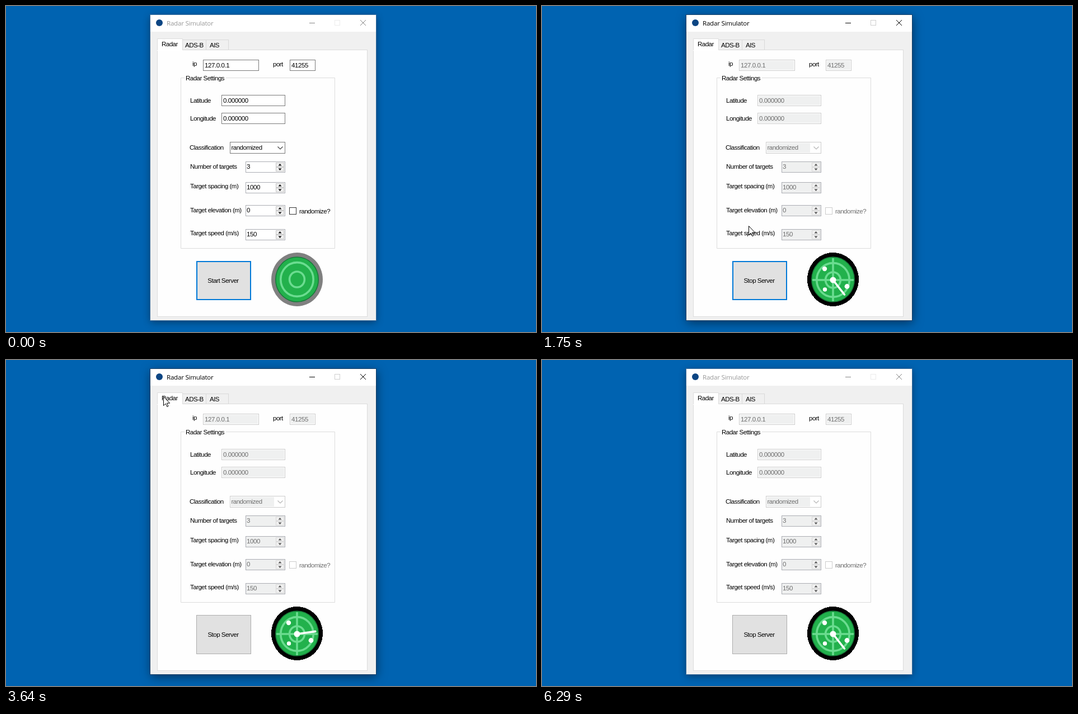
Animation of 947 by 583 pixels, one loop 6510 ms. Source, as an HTML page:

```html
<!DOCTYPE html>
<html lang="en">
<head>
<meta charset="utf-8">
<title>Radar Simulator</title>
<style>
html, body { margin: 0; width: 100%; height: 100%; overflow: hidden; background: #0063b1; }
svg { display: block; width: 947px; height: 583px; }
text { font: 11.5px "Liberation Sans", Arial, sans-serif; letter-spacing: -.5px; fill: #000; white-space: pre; }
text.val { letter-spacing: -.4px; }
text.mid { text-anchor: middle; }
text.title { font: 11.5px "Open Sans", "Noto Sans", sans-serif; letter-spacing: -.2px; fill: #999; }
rect { shape-rendering: crispEdges; }

.shadow { filter: drop-shadow(0 3px 7px rgba(0, 0, 0, .42)); }
.active .shadow { filter: drop-shadow(1px 4px 9px rgba(0, 0, 0, .5)); }
.edge { fill: none; stroke: #3f6f9c; }
.active .edge { stroke: #173f66; }
.chrome { fill: none; stroke: #858585; }
.max { fill: none; stroke: #ececec; }
.active .title { fill: #000; }
.active .chrome { stroke: #000; }
.active .max { stroke: #cfcfcf; }

.line { fill: none; stroke: #dcdcdc; }
.tab { fill: #f0f0f0; stroke: #d9d9d9; }
.front { fill: #fff; }
.hot-ads .ads, .hot-radar .radar { fill: #d8e9f8; }

.field { fill: #fff; stroke: #7a7a7a; }
.spin { fill: #fff; stroke: #abadb3; }
.step { fill: #f0f0f0; stroke: #c6c6c6; }
.grey { fill: none; }
.mark { fill: #111; }
.chevron { fill: none; stroke: #444; stroke-width: 1.2; }
.check { fill: #fff; stroke: #333; }
.on .p1 .field { stroke: #ccc; }
.on.warm .p1 .combo { stroke: #7a7a7a; }
.on .p1 .grey { fill: #eff0f0; }
.on .p1 .spin { fill: #eff0f0; }
.on .p1 .step { stroke: #d8d8d8; }
.on .p1 .dim { fill: #6d6d6d; }
.on .p1 .mark { fill: #555; }
.on .p1 .chevron { stroke: #b5b5b5; }
.on.warm .p1 .chevron { stroke: #444; }
.on .check { stroke: #ccc; }

.btn { fill: #e1e1e1; stroke: #adadad; }
.main { stroke: #0078d7; }
.focus { fill: none; stroke: #0078d7; }
.blur .main { stroke: #adadad; }
.hover .main { fill: #e5f1fb; }
.press .main { fill: #cce4f7; stroke: #005499; }
.hover .focus, .blur .focus { display: none; }

.adsb .p1, svg:not(.adsb) .p2, svg:not(.on) .run, .on .p1 .stop { display: none; }

.disc { fill: #22b14c; stroke: #187a3a; stroke-width: 1.6; }
.ring { fill: none; stroke: #6bdc90; stroke-width: 3.6; }
.white { fill: #fff; }
#sweep { stroke: #fff; stroke-width: 3.6; stroke-linecap: round; }
</style>
</head>
<body>
<svg id="stage" viewBox="0 0 947 583">
  <rect width="947" height="583" fill="#0063b1"/>
  <rect class="shadow" x="258" y="16" width="403" height="546" fill="#f0f0f0"/>
  <rect class="edge" x="257.5" y="15.5" width="404" height="547"/>
  <rect x="258" y="16" width="403" height="30" fill="#fff"/>
  <circle cx="274" cy="30" r="6" fill="#0b4583"/>
  <text class="title" x="287" y="35">Radar Simulator</text>
  <path class="chrome" d="M542 30.5h10M633 25l10 10M643 25l-10 10"/>
  <rect class="max" x="587.5" y="25.5" width="9" height="9"/>
  <rect x="270.5" y="78.5" width="375" height="477" fill="#fefefe" stroke="#dcdcdc"/>
  <g class="p1" id="radarPage"></g>
  <g class="p2" id="adsPage"></g>
  <path id="cursor" d="M.5 .5V16.6L4.2 13.1L6.8 18.6L9 17.6L6.5 12.2H11.6Z" fill="#fff" stroke="#000"/>
</svg>
<script>
const $ = id => document.getElementById(id);

const text = (x, y, s, cls = '') => `<text x="${x}" y="${y}" class="${cls}">${s}</text>`;
// Outlined box given by its outer pixel edges
const box = (x, y, w, h, cls) =>
  `<rect x="${x + .5}" y="${y + .5}" width="${w - 1}" height="${h - 1}" class="${cls}"/>`;
const fill = (x, y, w, h, cls) => `<rect x="${x}" y="${y}" width="${w}" height="${h}" class="${cls}"/>`;
const oval = (rx, ry, cls) => `<ellipse rx="${rx}" ry="${ry}" class="${cls}"/>`;
const dot = (x, y, r) => `<circle cx="${x}" cy="${y}" r="${r}" class="white"/>`;

const field = (x, y, w, s) =>
  box(x, y, w, 20, 'field') + fill(x + 2, y + 2, w - 4, 16, 'grey') + text(x + 3, y + 14, s, 'val dim');

const spinner = (y, s) =>
  box(428, y, 71, 20, 'spin') + box(482, y + 2, 15, 8, 'step') + box(482, y + 10, 15, 8, 'step') +
  `<path class="mark" d="M486.5 ${y + 7.5}h6l-3 -3.5zM486.5 ${y + 12.5}h6l-3 3.5z"/>` +
  text(430, y + 13, s, 'val dim');

const tab = (x0, x1, tx, s, cls = '') => box(x0, 60, x1 - x0 + 1, 19, 'tab ' + cls) + text(tx, 74, s);
const frontTab = (x0, x1, tx, s) =>
  `<path class="front" d="M${x0} 58H${x1 + 1}V80H${x0}z"/>` +
  `<path class="line" d="M${x0 + .5} 79V58.5H${x1 + .5}V79"/>` + text(tx, 72, s);

const group = (x, y, w, h, from, to, s) =>
  `<path class="line" d="M${from} ${y + .5}H${x + .5}v${h}h${w}v${-h}H${to}"/>` + text(from + 2, y + 5, s);

const rings = oval(29.2, 30.4, 'ring') + oval(13.4, 14, 'ring');

const idleRadar = (x, y) => `<g class="stop" transform="translate(${x} ${y})">` +
  '<ellipse rx="46" ry="48" fill="#808080"/>' + oval(38.2, 40, 'disc') + rings + '</g>';

const liveRadar = '<g class="run"><ellipse cx="520" cy="489" rx="46" ry="48" shape-rendering="crispEdges"/>' +
  '<g transform="translate(520 490)"><g transform="translate(0 -1)">' + oval(38.2, 40, 'disc') + '</g>' +
  rings + '<path class="ring" d="M-37 0H37M0 -39V38"/>' +
  dot(-15, -20, 4.2) + dot(25, 11.5, 4.4) + dot(-14.5, 17, 3.7) +
  '<path id="sweep" d="M0 0H33"/>' + dot(0, 0, 5.5) + '</g></g>';

$('radarPage').innerHTML =
  tab(315, 357, 320, 'ADS-B', 'ads') + tab(357, 397, 364, 'AIS') + frontTab(270, 315, 278, 'Radar') +
  text(333, 107, 'ip') + field(352, 96, 100, '127.0.0.1') +
  text(477, 108, 'port') + field(507, 96, 46, '41255') +
  group(312, 128, 275, 305, 319, 393, 'Radar Settings') +
  text(329, 173, 'Latitude') + field(385, 159, 114, '0.000000') +
  text(329, 205, 'Longitude') + field(385, 191, 114, '0.000000') +
  text(328, 257, 'Classification') + box(400, 243, 99, 21, 'field combo') +
  fill(402, 245, 77, 17, 'grey') + text(402.5, 257, 'randomized', 'dim') +
  '<path class="chevron" d="M485.5 251.5l4.5 4.5l4.5 -4.5"/>' +
  text(329, 291, 'Number of targets') + spinner(278, '3') +
  text(329, 326, 'Target spacing (m)') + spinner(315, '1000') +
  text(329, 369, 'Target elevation (m)') + spinner(356, '0') +
  text(329, 410, 'Target speed (m/s)') + spinner(399, '150') +
  box(506, 360, 13, 13, 'check') + text(524, 371, 'randomize?', 'dim') +
  box(340, 456, 98, 70, 'btn main') + box(341, 457, 96, 68, 'focus') +
  text(388, 495, 'Start Server', 'mid stop') + text(388, 495, 'Stop Server', 'mid run') +
  idleRadar(520, 489) + liveRadar;

$('adsPage').innerHTML =
  tab(272, 312, 278, 'Radar', 'radar') + tab(359, 397, 364, 'AIS') + frontTab(312, 359, 320, 'ADS-B') +
  text(298, 115, 'ip') + field(328, 101, 100, '127.0.0.1') +
  text(455, 115, 'port') + field(494, 100, 56, '6635') +
  group(299, 167, 302, 92, 306, 466, 'Targets Center Point Coordinates') +
  text(315, 219, 'lat') + field(337, 205, 83, '0.00000') +
  text(447, 219, 'long') + field(478, 205, 82, '0.00000') +
  box(329, 324, 95, 47, 'btn') + text(376, 352, 'Start Server', 'mid') +
  idleRadar(519, 350);

// The screen refreshes in ticks and rests after the last one
const LOOP = 6510, TICK = 110.3, LEAD = 25, LAST = 57;
const BEAT = 185, TURN = 30;

// Tick, then the classes that hold from there
const states = [
  [0, ''],
  [5, 'hover'],
  [10, 'active hover press'],
  [11, 'active on hover warm'],
  [12, 'active on hover'],
  [16, 'active on'],
  [21, 'active on hot-ads'],
  [24, 'active adsb'],
  [26, 'active adsb hot-radar'],
  [33, 'active on blur'],
  [56, 'on blur']
];

// Tick and pointer tip at the ends of each stroke
const stops = [
  [0, 950, 527], [1, 861, 523], [6, 384, 490],
  [14, 384, 490], [20, 322, 102], [22, 336, 65],
  [24, 336, 65], [28, 281, 65],
  [36, 281, 65], [41, 287, 273],
  [47, 287, 273], [52, 996, 618]
];

const ease = p => (1 - Math.cos(Math.PI * p)) / 2;

function pointer(n) {
  const i = stops.findIndex(s => s[0] > n);
  if (i < 0) return stops.at(-1).slice(1);
  const [t0, x0, y0] = stops[i - 1], [t1, x1, y1] = stops[i];
  const p = ease((n - t0) / (t1 - t0));
  return [x0 + (x1 - x0) * p, y0 + (y1 - y0) * p].map(Math.round);
}

const beam = n => 112 + TURN * Math.floor((n * TICK + 168) / BEAT);

const start = performance.now();

function draw(now) {
  const t = Math.max(0, now - start) % LOOP;
  const n = Math.min(LAST, Math.floor((t + LEAD) / TICK));
  $('stage').setAttribute('class', states.findLast(s => s[0] <= n)[1]);
  $('cursor').setAttribute('transform', `translate(${pointer(n)})`);
  $('sweep').setAttribute('transform', `rotate(${beam(n)})`);
  requestAnimationFrame(draw);
}
draw(start);
</script>
</body>
</html>
```
